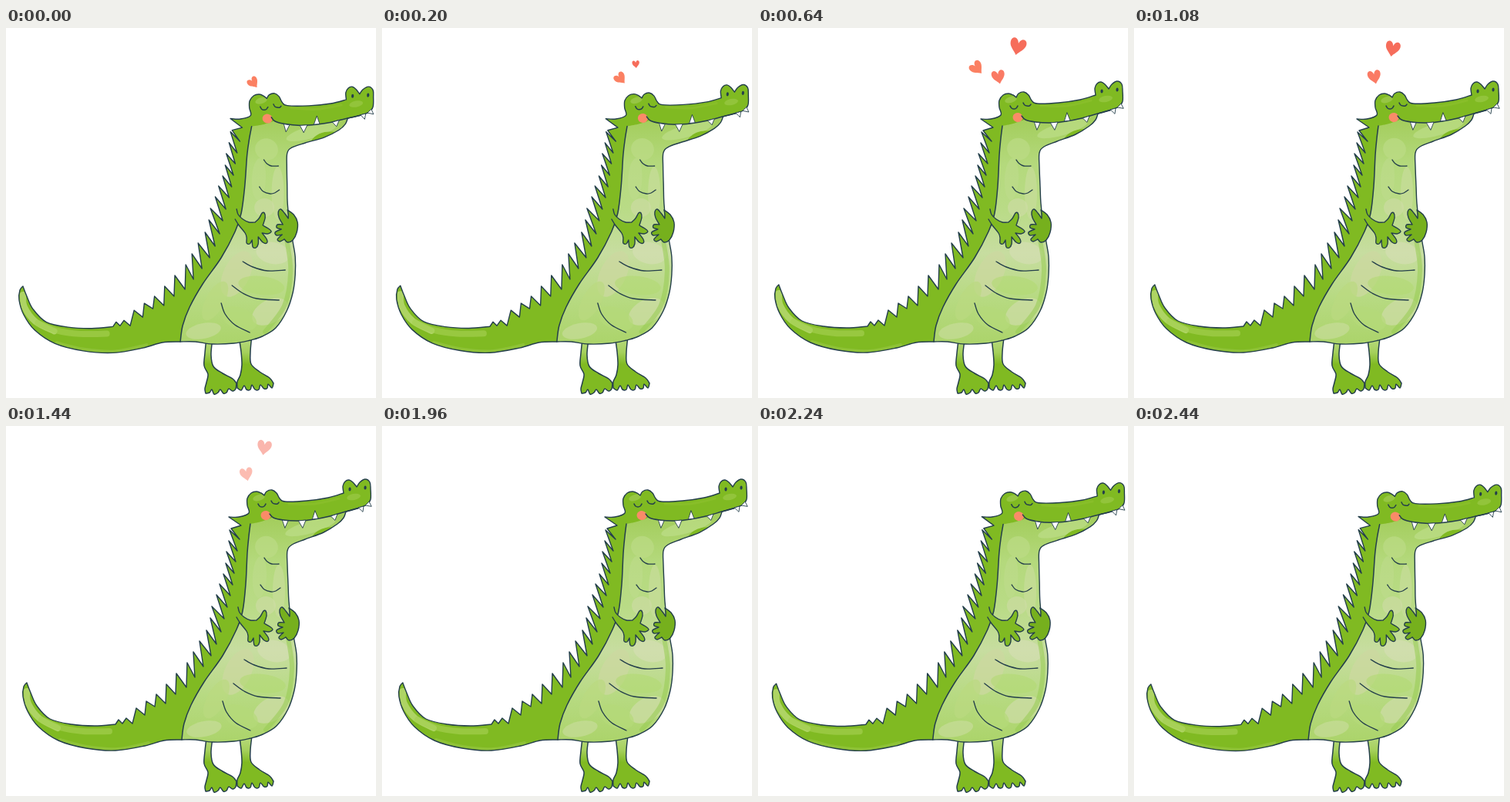
Recreate the animation shown at these times as an HTML page with a canvas. Size 480 by 480 pixels, loop 3.2 s.

```html
<!DOCTYPE html>
<html lang="en">
<head>
<meta charset="utf-8">
<title>Happy crocodile</title>
<style>
html, body { margin: 0; width: 100%; height: 100%; overflow: hidden; background: #fff; }
canvas { display: block; width: 100vw; height: 100vh; }
</style>
</head>
<body>
<canvas id="c" width="480" height="480"></canvas>
<script>
const ctx = document.getElementById('c').getContext('2d');
const LOOP = 3200, STEP = 40;
const INK = '#243f4b', GREEN = '#80ba22', DEEP = '#76b01d', LIGHT = '#b9db86';

const clamp = v => Math.max(0, Math.min(1, v));
const smooth = v => { v = clamp(v); return v * v * (3 - 2 * v); };

// 0 = chin up, 1 = relaxed
let rest = 0;

function warp(x, y) {
  const head = smooth((172 - y) / 48);
  const body = (1 - head) * clamp((412 - y) / 40);
  const tail = clamp((232 - x) / 200);
  const low = x < 232 ? 1 : body;
  const dx = head * (2 - 0.043 * (y - 120)) - (1 - head) * low * 1.8 * clamp((y - 150) / 80) - 3.2 * tail;
  const dy = head * (1.7 + 0.043 * (x - 340)) + 2 * tail * tail;
  return [x + dx * rest, y + dy * rest];
}

function pairs(list) {
  const out = [];
  for (let i = 0; i < list.length; i += 2) out.push(warp(list[i], list[i + 1]));
  return out;
}

// Catmull-Rom spline through the points
function curve(path, list, start) {
  const p = pairs(list), n = p.length;
  path[start ? 'moveTo' : 'lineTo'](...p[0]);
  for (let i = 0; i < n - 1; i++) {
    const a = p[Math.max(0, i - 1)], b = p[i], c = p[i + 1], d = p[Math.min(n - 1, i + 2)];
    path.bezierCurveTo(b[0] + (c[0] - a[0]) / 6, b[1] + (c[1] - a[1]) / 6,
      c[0] - (d[0] - b[0]) / 6, c[1] - (d[1] - b[1]) / 6, c[0], c[1]);
  }
}

function shape(...parts) {
  const path = new Path2D();
  parts.forEach((part, i) => curve(path, part, i === 0));
  path.closePath();
  return path;
}

function paint(path, fill, width = 1.4) {
  ctx.fillStyle = fill;
  ctx.fill(path);
  if (width) {
    ctx.lineWidth = width;
    ctx.stroke(path);
  }
}

function line(list, width = 1.4) {
  const path = new Path2D();
  curve(path, list, true);
  ctx.lineWidth = width;
  ctx.stroke(path);
}

function blob(x, y, rx, ry, angle, color) {
  ctx.fillStyle = color;
  ctx.beginPath();
  ctx.ellipse(...warp(x, y), rx, ry, angle, 0, Math.PI * 2);
  ctx.fill();
}

function fade(x0, y0, x1, y1, ...stops) {
  const g = ctx.createLinearGradient(x0, y0, x1, y1);
  stops.forEach((s, i) => g.addColorStop(i / (stops.length - 1), s));
  return g;
}

// alternating tip and valley, from the tail up to the head
const SPIKES = [
  142, 387, 146, 381, 151, 386, 156, 379, 164, 386, 169, 366, 180, 375, 182, 357, 193, 364,
  195, 348, 207, 360, 208, 335, 220, 348, 221, 321, 234, 339, 235, 307, 245, 326, 243, 293,
  256, 312, 251, 279, 266, 298, 260, 265, 273, 283, 265, 249, 279, 267, 267, 234, 283, 250,
  273, 219, 287, 235, 277, 205, 291, 220, 282, 192, 294, 206, 285, 178, 296, 191, 286, 163,
  298, 176, 289, 149, 300, 162, 290, 135, 303, 147, 292, 133, 305, 129, 289, 118
];

const SKULL = [289, 118, 302, 118, 315, 113, 313, 103, 313, 94, 318, 87, 325, 85, 331, 87, 335, 90];
const BROW = [335, 90, 338, 85, 345, 83, 351, 87, 355, 94, 362, 98, 390, 97, 418, 93, 438, 87];
const NOSE = [438, 87, 437, 78, 440, 72, 445, 70, 450, 73, 455, 79];
const TIP = [455, 79, 459, 73, 466, 69, 472, 73, 473, 82, 473, 95, 468, 102, 456, 107, 441, 111];
const JAW = [441, 111, 438, 119, 430, 127, 412, 138, 388, 147, 371, 154, 365, 162, 365, 180, 366, 205,
  367, 228, 370, 255, 374, 278, 377, 297, 377, 320, 374, 343, 366, 367, 351, 389, 333, 400, 318, 405];
const UNDER = [318, 405, 296, 409, 268, 410, 246, 407, 228, 407, 205, 408, 180, 415, 142, 421, 104, 418,
  68, 408, 42, 390, 28, 370, 22, 351, 23, 338, 27, 333];
const TAIL = [27, 333, 32, 346, 40, 363, 57, 380, 85, 387, 115, 389, 142, 387];
const SEAM = [228, 407, 231, 386, 240, 362, 257, 332, 281, 298, 299, 264, 307, 240, 311, 205,
  313, 165, 315, 143, 317, 127];
const SMILE = [342, 114, 347, 119, 360, 122, 380, 123, 400, 121, 420, 117, 441, 111, 462, 105];

function bodyPath() {
  const path = new Path2D();
  curve(path, TAIL, true);
  pairs(SPIKES).forEach(p => path.lineTo(...p));
  [SKULL, BROW, NOSE, TIP, JAW, UNDER].forEach(part => curve(path, part));
  path.closePath();
  return path;
}

function legs() {
  const skin = fade(0, 405, 0, 452, '#b5d97a', '#a5d05c', GREEN, GREEN);
  paint(shape(
    [260, 405, 258, 422, 257, 438, 262, 449, 260, 460, 258, 468, 259, 474],
    [259, 474, 264, 473, 267, 469, 270, 475, 275, 473, 278, 469, 282, 474, 286, 473, 289, 468,
      294, 471, 298, 468, 299, 461],
    [299, 461, 294, 455, 281, 448, 269, 439, 266, 424, 268, 405]), skin, 1.5);
  paint(shape(
    [303, 404, 305, 420, 306, 437, 304, 450, 300, 459, 300, 467],
    [300, 467, 305, 470, 309, 464, 312, 469, 317, 469, 319, 463, 323, 469, 328, 469, 330, 463,
      335, 468, 339, 467, 340, 462, 345, 467, 347, 461],
    [347, 461, 342, 454, 329, 446, 318, 436, 317, 421, 319, 402]), skin, 1.5);
}

function shading(belly) {
  // washes on tail and snout
  ctx.lineCap = 'round';
  const wash = (list, color, width) => {
    ctx.strokeStyle = color;
    line(list, width);
  };
  wash([27, 344, 29, 360, 43, 379, 67, 392], 'rgba(190,221,122,.75)', 8);
  wash([46, 381, 70, 391, 100, 396, 134, 396], 'rgba(165,207,80,.65)', 8);
  wash([70, 407, 105, 416, 145, 419, 185, 411], 'rgba(150,198,65,.65)', 4);
  wash([367, 101, 400, 101, 432, 94], 'rgba(145,195,50,.45)', 3);
  blob(451, 92, 9, 4, -0.2, 'rgba(158,204,75,.6)');
  blob(328, 93, 8, 4, -0.3, 'rgba(165,207,90,.6)');

  ctx.save();
  ctx.clip(belly);
  ctx.fillStyle = fade(0, 118, 0, 408, '#a3cd5c', '#b4d97c', LIGHT, '#c7dda0', '#b7da82', '#acd46b');
  ctx.fillRect(220, 100, 240, 315);
  blob(395, 131, 34, 8, -0.28, 'rgba(190,222,137,.7)');
  blob(338, 157, 15, 14, 0.4, 'rgba(188,220,135,.7)');
  blob(329, 196, 9, 27, 0.05, 'rgba(190,220,140,.6)');
  blob(354, 214, 8, 34, 0, 'rgba(201,222,157,.65)');
  blob(337, 233, 13, 12, 0, 'rgba(207,220,167,.6)');
  blob(348, 292, 22, 14, 0.2, 'rgba(212,223,179,.7)');
  blob(301, 319, 17, 32, 0.45, 'rgba(204,217,161,.75)');
  blob(333, 334, 30, 12, 0.12, 'rgba(179,218,116,.6)');
  blob(344, 368, 25, 15, -0.5, 'rgba(209,222,172,.65)');
  blob(273, 354, 12, 28, 0.5, 'rgba(187,218,128,.7)');
  blob(304, 377, 24, 14, 0.4, 'rgba(182,218,122,.7)');
  blob(257, 393, 23, 10, -0.2, 'rgba(202,221,157,.65)');
  wash([366, 275, 371, 315, 363, 360, 337, 394], 'rgba(151,204,82,.55)', 6);
  ctx.restore();
  ctx.strokeStyle = INK;
}

function tooth(...p) {
  const path = new Path2D();
  pairs(p).forEach(q => path.lineTo(...q));
  path.closePath();
  paint(path, '#fff', 0.9);
}

function face() {
  blob(337, 116, 6.5, 6, 0.2, '#fa8b68');
  line(SMILE, 1.5);
  tooth(358, 122, 366, 123, 362, 132);
  tooth(379, 123, 389, 122, 385, 132);
  tooth(421, 117, 430, 114, 427, 122);
  tooth(397, 121, 405, 120, 401, 110);
  tooth(457, 106, 464, 104, 463, 111);
  tooth(466, 103, 471, 98, 474, 104);
  line([327, 101, 329, 104, 332, 105, 335, 104, 337, 101], 1.5);
  line([344, 97, 346, 100, 349, 101, 352, 101, 354, 99], 1.5);
  blob(446, 82, 1.6, 2.6, 0.1, INK);
  blob(466, 80, 1.6, 2.6, 0.1, INK);
}

function arms() {
  const left = [
    [301, 235, 303, 242, 309, 248, 317, 252, 325, 252],
    [325, 252, 330, 247, 334, 240, 337, 240, 338, 246, 335, 256],
    [335, 256, 342, 260, 346, 264, 341, 267, 334, 266],
    [334, 266, 340, 274, 340, 279, 335, 278, 329, 271],
    [329, 271, 329, 280, 326, 285, 322, 284, 321, 275],
    [321, 275, 318, 280, 314, 279, 314, 272, 312, 266, 304, 256, 299, 248]
  ];
  const path = new Path2D();
  left.forEach((part, i) => curve(path, part, i === 0));
  paint(path, GREEN);
  paint(shape(
    [367, 236, 375, 242, 380, 252, 379, 265, 374, 275, 367, 278, 363, 274],
    [363, 274, 357, 277, 354, 274, 360, 268],
    [360, 268, 353, 269, 351, 265, 359, 261],
    [359, 261, 353, 259, 354, 255, 361, 255],
    [361, 255, 356, 246, 355, 239, 358, 235, 363, 240, 368, 247],
    [368, 247, 368, 241, 367, 236]), DEEP);
}

function croc() {
  ctx.strokeStyle = INK;
  ctx.lineJoin = ctx.lineCap = 'round';
  legs();
  const body = bodyPath();
  paint(body, GREEN, 0);
  ctx.save();
  ctx.clip(body);
  shading(shape(SEAM, [317, 127, 331, 124, 345, 119], SMILE.slice(4, 14),
    [441, 111, 450, 130, 390, 160, 385, 400, 318, 415, 228, 412]));
  ctx.restore();
  ctx.lineWidth = 1.4;
  ctx.stroke(body);
  line(SEAM, 1.5);
  line([335, 171, 339, 176, 345, 179, 354, 179], 1.3);
  line([330, 206, 335, 212, 344, 215, 350, 214, 356, 210], 1.3);
  line([309, 303, 322, 310, 341, 315, 364, 314], 1.4);
  line([295, 334, 309, 344, 327, 351, 356, 353], 1.4);
  line([281, 357, 286, 371, 298, 385, 317, 395], 1.4);
  arms();
  face();
}

// each key: time, x, y, size, tilt in degrees, opacity
const HEARTS = [
  ['#fb8062', [[0, 321, 71, 14, -38, 1], [400, 298, 60, 16, -45, 1], [640, 284, 52, 17, -42, 1],
    [880, 270, 45, 17, -42, 0]]],
  ['#f66d5b', [[80, 326, 58, 0, -10, 1], [400, 335, 28.5, 25, 0, 1], [540, 337, 22, 24, 8, 1],
    [640, 337, 24, 21, 13, 1], [1080, 335.5, 27, 19, 12, 1], [1320, 335, 28, 19, 10, 1], [1560, 335, 28, 18, 8, 0]]],
  ['#fa7a64', [[440, 316, 73, 0, -20, 1], [640, 312, 63.5, 17, -12, 1], [1080, 312, 63.5, 17, -12, 1],
    [1320, 312, 63, 17, -12, 1], [1560, 312, 62, 16, -12, 0]]]
];

function heart(color, keys, t) {
  const i = keys.findIndex((k, n) => n && t < k[0]) - 1;
  if (i < 0 || t < keys[0][0]) return;
  const a = keys[i], b = keys[i + 1], f = (t - a[0]) / (b[0] - a[0]);
  const [, x, y, size, tilt, alpha] = a.map((v, n) => v + (b[n] - v) * f);
  ctx.save();
  ctx.translate(x, y);
  ctx.rotate(tilt * Math.PI / 180);
  ctx.scale(size, size);
  ctx.globalAlpha = alpha;
  ctx.fillStyle = color;
  ctx.beginPath();
  ctx.moveTo(0, 0.54);
  ctx.bezierCurveTo(-0.16, 0.28, -0.5, 0.12, -0.5, -0.22);
  ctx.bezierCurveTo(-0.5, -0.58, -0.1, -0.62, 0, -0.2);
  ctx.bezierCurveTo(0.1, -0.62, 0.52, -0.56, 0.5, -0.2);
  ctx.bezierCurveTo(0.48, 0.12, 0.14, 0.3, 0, 0.54);
  ctx.fill();
  ctx.restore();
}

function draw(now) {
  const t = Math.floor(now % LOOP / STEP) * STEP;
  rest = 1 - smooth(t / 480) + smooth((t - 1940) / 500);
  ctx.fillStyle = '#fff';
  ctx.fillRect(0, 0, 480, 480);
  croc();
  HEARTS.forEach(([color, keys]) => heart(color, keys, t));
}

const begin = performance.now();
function tick() {
  draw(performance.now() - begin);
  requestAnimationFrame(tick);
}
tick();
</script>
</body>
</html>
```
